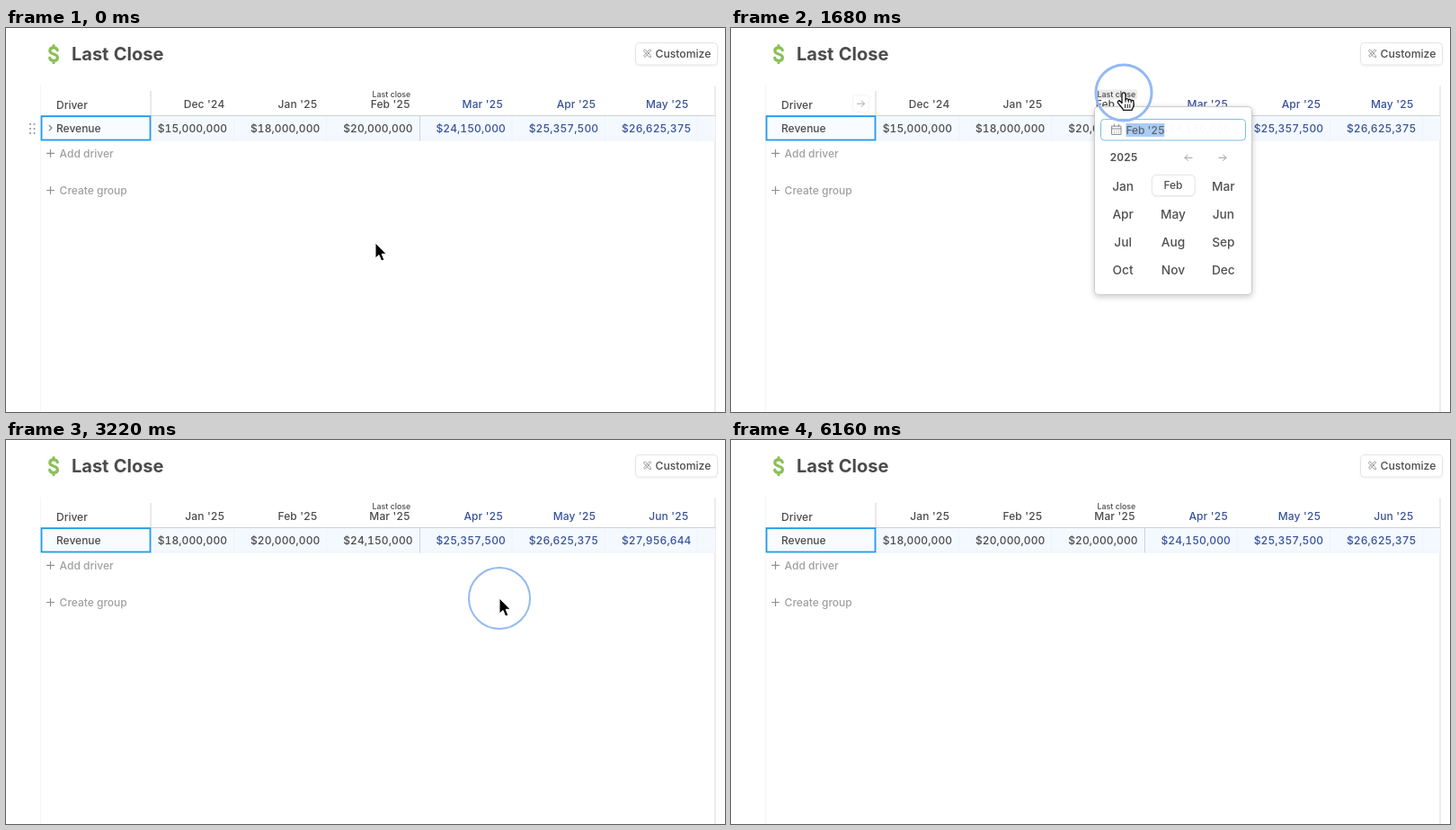
An HTML page for the animation above (6230 ms loop, 800 by 427 pixels).

```html
<!DOCTYPE html>
<html lang="en">
<head>
<meta charset="utf-8">
<title>Last Close</title>
<style>
  html, body { margin: 0; width: 100%; height: 100%; overflow: hidden; background: #fff; }
  svg { display: block; width: 100vw; height: 100vh; }
  text {
    font: 500 12px Inter, "Open Sans", sans-serif;
    font-variant-numeric: tabular-nums;
    font-optical-sizing: none;
    fill: #4b4b4b;
    white-space: pre;
  }
  .title { font-size: 20px; font-weight: 700; }
  .button { font-size: 12.2px; }
  .tiny { font-size: 8.8px; }
  .muted { fill: #a0a0a0; }
  .end { text-anchor: end; letter-spacing: .1px; }
  .mid { text-anchor: middle; }
  .forecast { fill: #38529c; }
  .month { font-size: 13.7px; }
  .year { font-weight: 600; }
  .line { fill: none; stroke-linecap: round; stroke-linejoin: round; }

  .loop { animation: 6.23s linear infinite; }
  .switch { animation-timing-function: step-end; }

  #before  { animation-name: before; }
  #shifted { animation-name: shifted; }
  #settled { animation-name: settled; }
  #rowTools { animation-name: rowTools; }
  .headHover { animation-name: headHover; }
  #popup { animation-name: popup; transform-origin: 404px 87px; }
  #cursor { animation-name: move; }
  #pulse { animation-name: pulse; }
  #arrow { animation-name: arrow; }
  #hand { animation-name: hand; }

  @keyframes before  { 0% { visibility: visible } 50.5%, 100% { visibility: hidden } }
  @keyframes shifted { 0% { visibility: hidden } 50.5% { visibility: visible } 66.2%, 100% { visibility: hidden } }
  @keyframes settled { 0% { visibility: hidden } 66.2%, 100% { visibility: visible } }
  @keyframes rowTools { 0% { visibility: visible } 24.7%, 100% { visibility: hidden } }
  @keyframes headHover { 0% { visibility: hidden } 8.9% { visibility: visible } 34.8%, 100% { visibility: hidden } }
  @keyframes arrow { 0% { visibility: visible } 8.9% { visibility: hidden } 50.5%, 100% { visibility: visible } }
  @keyframes hand { 0% { visibility: hidden } 8.9% { visibility: visible } 50.5%, 100% { visibility: hidden } }

  @keyframes popup {
    0%, 24.6% { opacity: 0; transform: scale(.9); animation-timing-function: cubic-bezier(.22, .8, .4, 1) }
    28.1%, 48.6% { opacity: 1; transform: scale(1) }
    51.2%, 100% { opacity: 0; transform: scale(.97) }
  }
  @keyframes move {
    0%, .6% { transform: translate(411px, 239px); opacity: 1; animation-timing-function: cubic-bezier(.4, 0, .25, 1) }
    12.4%, 16.3% { transform: translate(442.5px, 72px); animation-timing-function: ease-in-out }
    21.35%, 33.2% { transform: translate(437px, 72px); animation-timing-function: cubic-bezier(.45, 0, .6, .9) }
    37.08% { transform: translate(547.5px, 156px); animation-timing-function: ease-out }
    41.57%, 81.4% { transform: translate(549px, 176px); opacity: 1 }
    87.2%, 100% { transform: translate(549px, 176px); opacity: 0 }
  }
  @keyframes pulse {
    0%, 24.4% { r: 0; stroke-width: 4px; opacity: 1; animation-timing-function: ease-out }
    26.97% { r: 31px; stroke-width: 3px; opacity: 1 }
    28.1% { r: 34px; stroke-width: 2px; opacity: 1 }
    31.4% { r: 36px; stroke-width: .5px; opacity: 0 }
    31.5%, 48% { r: 0; stroke-width: 4px; opacity: 1; animation-timing-function: ease-out }
    50.56% { r: 31px; stroke-width: 3px; opacity: 1 }
    51.69% { r: 34px; stroke-width: 2px; opacity: 1 }
    55.4% { r: 36px; stroke-width: .5px; opacity: 0 }
    55.5%, 100% { r: 0; opacity: 0 }
  }
</style>
</head>
<body>
<svg viewBox="0 0 800 427">
  <defs>
    <filter id="shadow" x="-20%" y="-20%" width="140%" height="140%">
      <feDropShadow dx="0" dy="2" stdDeviation="3.5" flood-opacity=".22"/>
    </filter>
    <filter id="soft" x="-10%" y="-20%" width="120%" height="150%">
      <feDropShadow dx="0" dy="1" stdDeviation=".8" flood-opacity=".06"/>
    </filter>
  </defs>

  <!-- page heading -->
  <path class="line" stroke="#8ac056" stroke-width="3.2" d="M57.3 24.8C56.6 22.7 55 21.8 53 21.8C50.4 21.8 48.8 23.2 48.8 25.2C48.8 27.6 50.8 28.3 53 29C55.4 29.7 57.4 30.6 57.4 33C57.4 35.2 55.6 36.4 53 36.4C50.8 36.4 49.2 35.3 48.6 33.2M53 19.6v2M53 36.6v2"/>
  <text class="title" x="73" y="36.3">Last Close</text>
  <rect x="700.5" y="16.5" width="91" height="24.5" rx="4" fill="#fff" stroke="#e4e4e4" filter="url(#soft)"/>
  <path class="line" stroke="#888" stroke-width=".8" d="M709.6 25l1.4-1.2 6.2 6.8.4 2-2-.5zM717.6 25l-1.4-1.2-6.7 7.2 1.6 1.4 6.5-7.4"/>
  <text class="button" x="722.5" y="33">Customize</text>

  <!-- table frame -->
  <path class="line" stroke="#f5f5f5" d="M38.5 64V427"/>
  <path class="line" stroke="#e6e6e6" stroke-width="1.5" d="M789 65V427"/>
  <rect x="161" y="98" width="628" height="27" fill="#f4f9ff"/>
  <path class="line" stroke="#ecf3fa" d="M253.5 98v27M356.5 98v27M563 98v27M666.5 98v27M769.5 98v27M161 125H789"/>
  <path class="line" stroke="#d2d2d2" d="M161 70.5V97M39 97.5H789"/>
  <path class="line" stroke="#c9d2de" d="M460.5 98v27"/>
  <rect x="39.5" y="98.2" width="121" height="26.3" fill="#f8fbff" stroke="#219bec" stroke-width="1.8"/>
  <text x="56" y="89.7">Driver</text>
  <text x="56" y="115.6">Revenue</text>
  <g class="line" stroke="#8f8f8f" stroke-width="1.2">
    <path d="M45.5 139.3h8M49.5 135.3v8M45.5 180.5h8M49.5 176.5v8"/>
  </g>
  <text class="muted" x="59.6" y="143.8">Add driver</text>
  <text class="muted" x="59.6" y="185.2">Create group</text>

  <g id="rowTools" class="loop switch">
    <path class="line" stroke="#999" stroke-width="2.2" d="M27 107h0M31.5 107h0M27 112h0M31.5 112h0M27 117h0M31.5 117h0"/>
    <path class="line" stroke="#777" stroke-width="1.2" d="M48.2 108.4l2.7 2.7-2.7 2.7"/>
  </g>
  <g class="loop switch headHover">
    <rect x="135.5" y="74.5" width="18" height="19" rx="3" fill="#fff" stroke="#f4f4f4"/>
    <path class="line" stroke="#aaa" d="M140.5 84.2h8M145.3 81l3.2 3.2-3.2 3.2"/>
    <rect x="405" y="68.5" width="47" height="11" rx="2" fill="#ebebeb"/>
  </g>
  <g id="before" class="loop switch"></g>
  <g id="shifted" class="loop switch"></g>
  <g id="settled" class="loop switch"></g>
  <text class="tiny" x="407.6" y="77.2">Last close</text>

  <!-- month picker -->
  <g id="popup" class="loop">
    <rect x="404.5" y="87.5" width="175.5" height="209.5" rx="4" fill="#fff" stroke="#cacaca" filter="url(#shadow)"/>
    <rect x="411.5" y="101.5" width="161.5" height="23.5" rx="4" fill="#fff" stroke="#74bce9"/>
    <path class="line" stroke="#888" d="M424 109.2h10v9.3h-10zM424 112h10M426.6 107.3v2M431.4 107.3v2"/>
    <path class="line" stroke="#999" stroke-width="1.2" d="M426.5 114.2h0M429 114.2h0M431.5 114.2h0M426.5 116.4h0M429 116.4h0M431.5 116.4h0"/>
    <rect x="439.5" y="106" width="43" height="15" fill="#a9cbf3"/>
    <text x="439.5" y="117.8" style="fill:#56606e">Feb '25</text>
    <text class="year" x="421.5" y="148.6">2025</text>
    <path class="line" stroke="#999" d="M513.3 144.4h-8M508.5 141.2l-3.2 3.2 3.2 3.2M543.3 144.4h8M548.1 141.2l3.2 3.2-3.2 3.2"/>
    <rect x="468.5" y="163.5" width="48" height="23.5" rx="5" fill="#fff" stroke="#e2e2e2" filter="url(#soft)"/>
    <g id="months"></g>
  </g>

  <!-- pointer, its hot spot at 0,0 -->
  <g id="cursor" class="loop">
    <circle id="pulse" class="loop" fill="none" stroke="#93b9f4"/>
    <path id="arrow" class="loop switch" fill="#000" stroke="#fff" stroke-width="1" stroke-linejoin="round" d="M0 0V17L4 13.5 6.7 20 9.8 18.7 7.1 12.3H12.2Z"/>
    <g id="hand" class="loop switch" stroke="#111" stroke-width="1.3" stroke-linejoin="round" stroke-linecap="round">
      <path fill="#fff" d="M-2 1.8C-2-.7 2-.7 2 1.8V7.8C2 6.2 5.2 6.2 5.2 8.4C5.2 6.9 8.2 7 8.2 9.2C8.2 8 11 8 11 10.4V13.6C11 16.6 9.5 17 9 19.3H-.5C-1 17-5 14-6.6 11C-7.4 9.2-5 8.2-3.6 9.8L-2 11.6Z"/>
      <path fill="none" stroke-width="1" d="M2 7.8v2.4M5.2 8.4v2.2M8.2 9.2v1.8M1.6 13v3.6M4.2 13v3.6M6.8 13v3.6"/>
    </g>
  </g>
</svg>
<script>
const NAMES = 'Jan Feb Mar Apr May Jun Jul Aug Sep Oct Nov Dec'.split(' ');
const $ = id => document.getElementById(id);

function label(parent, text, x, y, cls) {
  const el = document.createElementNS('http://www.w3.org/2000/svg', 'text');
  el.setAttribute('x', x);
  el.setAttribute('y', y);
  el.setAttribute('class', cls);
  el.textContent = text;
  parent.append(el);
}

// start counts months from January 2025
function columns(id, start, values) {
  values.forEach((value, i) => {
    const m = start + i;
    const head = `${NAMES[(m + 12) % 12]} '${m < 0 ? 24 : 25}`;
    const cls = i < 3 ? 'end' : 'end forecast';
    const x = 246.2 + i * 103.25;
    label($(id), head, x - 2.7, 89.3, cls);
    label($(id), '$' + value.toLocaleString('en-US'), x, 115.6, cls);
  });
}

const [a, b, c, d, e, f, g] = [15e6, 18e6, 20e6, 24150000, 25357500, 26625375, 27956644];
columns('before', -1, [a, b, c, d, e, f]);
columns('shifted', 0, [b, c, d, e, f, g]);
columns('settled', 0, [b, c, c, d, e, f]);

NAMES.forEach((name, i) => {
  const picked = i === 1;
  const y = 181.3 + Math.floor(i / 3) * 31;
  label($('months'), name, 436.2 + (i % 3) * 56, picked ? 179.3 : y, picked ? 'mid' : 'mid month');
});
</script>
</body>
</html>
```
